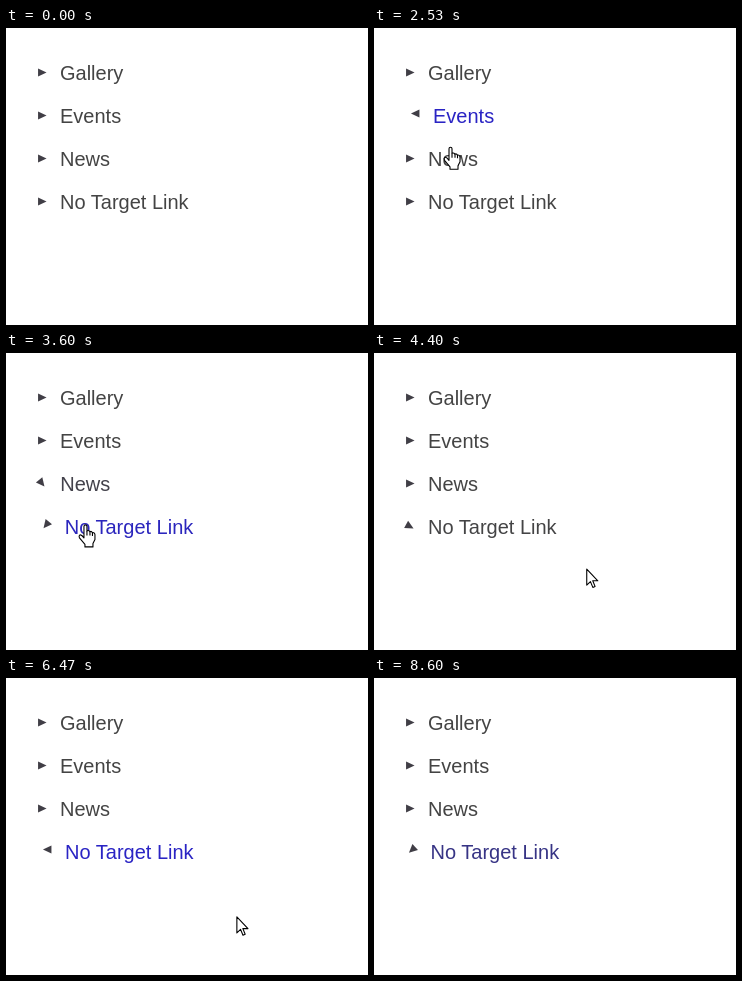
Recreate the animation shown at these times as an HTML page. Size 362 px wide and 297 px high, loop 8670 ms.

```html
<!DOCTYPE html>
<html lang="en">
<head>
<meta charset="utf-8">
<title>Hover menu</title>
<style>
  html, body { margin: 0; width: 100%; height: 100%; overflow: hidden; background: #fff; }
  svg { display: block; width: 362px; height: 297px; }
  text { font: 20px "Liberation Sans", Arial, sans-serif; }
  .pointer path { fill: #fff; stroke: #000; stroke-width: 1.1; stroke-linejoin: round; }
</style>
</head>
<body>
<svg viewBox="0 0 362 297">
  <g id="menu"></g>
  <g id="hand" class="pointer">
    <path d="M5.5 13.5V2Q5.5.5 7 .5T8.5 2V6.5Q10 5.5 11.5 7.3Q13 6.5 14 8.3Q16 7.8 16.5 10.3V15L14.5 19V22.5H6.5V20L1 13.5Q0 11.5 1.5 10.5Q3 10 5.5 13.5Z"/>
    <path d="M8.5 6.5V11M11.5 7.3V11M14 8.3V11.5"/>
  </g>
  <g id="arrow" class="pointer">
    <path d="M6.5.5V16.5L10.2 13L12.6 18.8L14.8 17.8L12.5 12.2H17.6Z"/>
  </g>
</svg>
<script>
const LOOP = 8670;
const STEP = 1000 / 15;
const ROW = 43;
const SHIFT_TIME = 300;
const SPIN_TIME = 500;
const SHOW = 600, HIDE = 7600;
const DRIFT_END = 4000, DRIFT_PERIOD = 933;
const REST = [68, 68, 68];
const ACTIVE = [42, 36, 196];
const labels = ["Gallery", "Events", "News", "No Target Link"];

// Each visit lasts until the next one; -1 is outside the menu.
const visits = [
  { row: 0, at: 665 }, { row: 1, at: 1608 }, { row: 2, at: 2545 }, { row: 3, at: 3388 },
  { row: -1, at: 4130 }, { row: 3, at: 4770 }, { row: -1, at: 8513 }
];

// Pointer glides that follow the slow drift down the menu.
const glides = [
  { from: 4000, to: 4450, dx: 136, dy: 40.5 },
  { from: 4450, to: 4930, dx: -95, dy: -46.5 },
  { from: 5800, to: 6533, dx: 111, dy: 69.5 },
  { from: 6933, to: HIDE, dx: -173, dy: 60 }
];

const svgNode = (name, attrs, parent) => {
  const node = document.createElementNS("http://www.w3.org/2000/svg", name);
  for (const key in attrs) node.setAttribute(key, attrs[key]);
  return parent.appendChild(node);
};

const menu = document.getElementById("menu");
const hand = document.getElementById("hand");
const arrow = document.getElementById("arrow");

const rows = labels.map((label, i) => {
  const base = 52 + ROW * i;
  const marker = svgNode("path", { d: "M-4.2-3.1L4.3 1L-4.2 5.1Z", fill: "#403e46" }, menu);
  const text = svgNode("text", { x: 54, y: base }, menu);
  text.textContent = label;
  return { base, marker, text };
});

const clamp = x => Math.min(1, Math.max(0, x));
const smooth = x => x * x * (3 - 2 * x);

// CSS "ease": cubic-bezier(.25, .1, .25, 1)
function ease(x) {
  if (x <= 0) return 0;
  if (x >= 1) return 1;
  const curve = (u, a, b) => 3 * u * (1 - u) * ((1 - u) * a + u * b) + u ** 3;
  let lo = 0, hi = 1;
  for (let i = 0; i < 24; i++) {
    const mid = (lo + hi) / 2;
    if (curve(mid, .25, .25) < x) lo = mid; else hi = mid;
  }
  return curve(lo, .1, 1);
}

const hoverLevel = (row, t, span) => visits.reduce((sum, visit, i) => {
  if (visit.row !== row) return sum;
  return sum + ease((t - visit.at) / span) - ease((t - visits[i + 1].at) / span);
}, 0);

// The drift slows down over each row, then the glides add up.
function pointerAt(t) {
  const phase = (Math.min(t, DRIFT_END) - SHOW) / DRIFT_PERIOD;
  let x = 69.5 + 2 * (phase - 2) ** 2;
  let y = 15 + 46.5 * phase + 8 * Math.cos(2 * Math.PI * (phase - .13));
  for (const { from, to, dx, dy } of glides) {
    const k = smooth(clamp((t - from) / (to - from)));
    x += dx * k;
    y += dy * k;
  }
  return { x, y };
}

function drawRow({ base, marker, text }, i, t) {
  const level = hoverLevel(i, t, SHIFT_TIME);
  const angle = 180 * hoverLevel(i, t, SPIN_TIME);
  const shift = 5 * level;
  const color = REST.map((c, n) => Math.round(c + (ACTIVE[n] - c) * level));
  marker.setAttribute("transform", `translate(${36.25 + shift} ${base - 8.5}) rotate(${angle})`);
  text.setAttribute("transform", `translate(${shift} 0)`);
  text.setAttribute("fill", `rgb(${color})`);
}

function drawPointer(t) {
  const { x, y } = pointerAt(t);
  const visible = t >= SHOW && t < HIDE;
  const onLink = y > 30 && y < 195 && x < 182;
  hand.style.display = visible && onLink ? "" : "none";
  arrow.style.display = visible && !onLink ? "" : "none";
  (onLink ? hand : arrow).setAttribute("transform", `translate(${x} ${y})`);
}

const start = performance.now();

function frame() {
  const now = Math.max(0, performance.now() - start) % LOOP;
  // The picture advances at 15 steps a second.
  const t = Math.round(Math.floor((now + 4) / STEP) * STEP) % LOOP;
  rows.forEach((row, i) => drawRow(row, i, t));
  drawPointer(t);
  requestAnimationFrame(frame);
}
frame();
</script>
</body>
</html>
```
